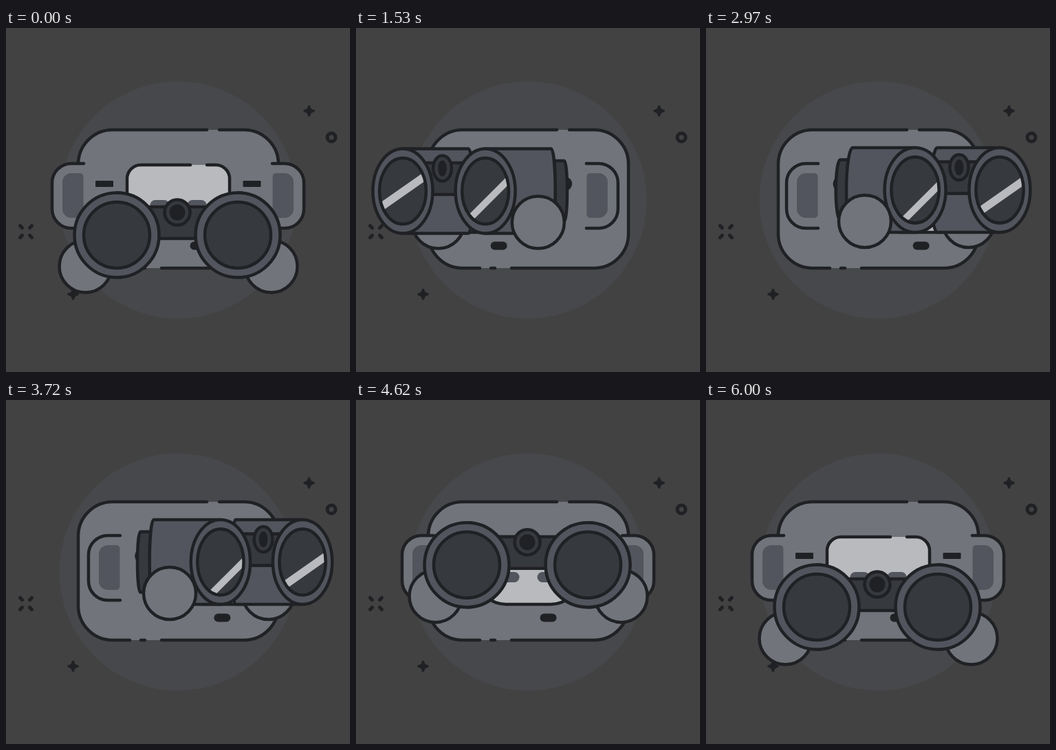
An HTML page with a canvas for the animation above (6030 ms loop, 500 by 500 pixels).

```html
<!DOCTYPE html>
<html lang="en">
<head>
<meta charset="utf-8">
<title>Looking around</title>
<style>
html, body { margin: 0; width: 100%; height: 100%; overflow: hidden; background: #424242; }
canvas { display: block; width: 500px; height: 500px; }
</style>
</head>
<body>
<canvas id="stage" width="500" height="500"></canvas>
<script>
const ctx = document.getElementById('stage').getContext('2d');
const LOOP = 6030;
const INK = '#202125', GREY = '#71757b', SLATE = '#52555d', DARK = '#36393e', LIGHT = '#b9babe';
const LINE = 4.5;

// Steps: start, end, from, to, power of the ease
const TURN = [
  [645, 1915, 0, -1.18, 2.5],
  [1915, 3320, -1.18, 1.18, 2.5],
  [3400, 4495, 1.18, 0, 2.5]
];
const LIFT = [
  [255, 1915, 0, 1, 4],
  [4150, 5730, 1, 0, 4]
];

function ease(x, p) {
  return x < 0.5 ? Math.pow(2 * x, p) / 2 : 1 - Math.pow(2 - 2 * x, p) / 2;
}

function valueAt(steps, t) {
  let v = steps[0][2];
  for (const [start, end, from, to, p] of steps) {
    if (t < start) break;
    v = from + (to - from) * ease(Math.min(1, (t - start) / (end - start)), p);
  }
  return v;
}

function paint(fill, stroke = true) {
  if (fill) { ctx.fillStyle = fill; ctx.fill(); }
  if (stroke) { ctx.strokeStyle = INK; ctx.lineWidth = LINE; ctx.stroke(); }
}

function oval(x, y, rx, ry, fill, stroke) {
  ctx.beginPath();
  ctx.ellipse(x, y, rx, ry, 0, 0, 2 * Math.PI);
  paint(fill, stroke);
}

function box(x, y, w, h, r, fill, stroke) {
  ctx.beginPath();
  ctx.roundRect(x, y, w, h, r);
  paint(fill, stroke);
}

function trace(d, width = LINE) {
  ctx.strokeStyle = INK;
  ctx.lineWidth = width;
  ctx.stroke(new Path2D(d));
}

function at(x, y, sx, draw) {
  ctx.save();
  ctx.translate(x, y);
  ctx.scale(sx, 1);
  draw();
  ctx.restore();
}

function sparkle(x, y) {
  at(x, y, 1, () => {
    const star = new Path2D('M0-6.5Q.8-.8 6.5 0Q.8.8 0 6.5Q-.8.8-6.5 0Q-.8-.8 0-6.5Z');
    ctx.fillStyle = INK;
    ctx.fill(star);
    ctx.strokeStyle = INK;
    ctx.lineWidth = 3.5;
    ctx.stroke(star);
  });
}

function backdrop() {
  ctx.fillStyle = '#424242';
  ctx.fillRect(0, 0, 500, 500);
  oval(250, 250, 172.5, 172.5, '#47484b', false);
  sparkle(440.5, 120.5);
  sparkle(97.5, 387);
  ctx.beginPath();
  ctx.arc(473, 159, 6, 0, 2 * Math.PI);
  ctx.strokeStyle = INK;
  ctx.lineWidth = 5;
  ctx.stroke();
  at(29, 296, 1, () => trace('M-8.5-8.5l3 3M8.5-8.5l-3 3M-8.5 8.5l3-3M8.5 8.5l-3-3', 5));
}

function head() {
  box(105, 148, 291, 201, 50, GREY, false);
  trace('M292 148H155A50 50 0 0 0 105 198V299A50 50 0 0 0 155 349H180' +
    'M196 349H202M226 349H346A50 50 0 0 0 396 299V198A50 50 0 0 0 346 148H310');
}

function face(shift, mouthShift, lift) {
  at(shift, 0, 1, () => {
    box(176, 199, 149, 98, [20, 20, 42, 42], LIGHT, false);
    trace('M268 199H196A20 20 0 0 0 176 219V255A42 42 0 0 0 218 297H283' +
      'A42 42 0 0 0 325 255V219A20 20 0 0 0 305 199H292');
    for (const x of [209.5, 263.5]) box(x, 250, 28, 15, 7.5, SLATE, false);
  });
  const w = 26 - 5 * lift, h = 9 + 12 * lift;
  for (const x of [143, 357.5]) {
    box(x + shift * 0.82 - w / 2, 226.5 - h / 2, w, h, 1 + 9.5 * lift, INK, false);
  }
  box(267.5 + mouthShift, 310.5, 24, 12, 6, INK, false);
}

function ear(x, side) {
  at(x, 0, -side, () => {
    box(0, 197, 48, 94, [28, 0, 0, 28], GREY, false);
    trace('M46 197H28A28 28 0 0 0 0 225V263A28 28 0 0 0 28 291H46');
    box(15, 211, 30.5, 65, [13, 5, 5, 13], SLATE, false);
  });
}

// Side of a tube running from the lens back towards the head
function tube(x, y, back, rx, ry, dir, fill) {
  ctx.beginPath();
  ctx.moveTo(x, y - ry);
  ctx.lineTo(x + dir * back, y - ry);
  ctx.ellipse(x + dir * back, y, rx, ry, 0, -Math.PI / 2, Math.PI / 2, dir < 0);
  ctx.lineTo(x, y + ry);
  ctx.closePath();
  paint(fill);
}

function barrel(x, y, u, dir) {
  const back = 58 * u + 36 * u * u;
  const rx = Math.max(6, 61 - 19 * u - 35 * u * u);
  tube(x, y, back * 1.2, rx * 0.7, 44, dir, DARK);
  tube(x, y, back, rx, 61.5, dir, SLATE);
}

function lens(x, y, rx, glintY, slope) {
  const inner = rx * 0.78;
  oval(x, y, rx, 61.5, SLATE);
  oval(x, y, inner, 48, DARK, false);
  ctx.save();
  ctx.beginPath();
  ctx.ellipse(x, y, inner, 48, 0, 0, 2 * Math.PI);
  ctx.clip();
  ctx.translate(x, y + glintY);
  ctx.beginPath();
  ctx.moveTo(-60, 60 * slope - 7);
  ctx.lineTo(60, -60 * slope - 7);
  ctx.lineTo(60, -60 * slope + 7);
  ctx.lineTo(-60, 60 * slope + 7);
  ctx.fillStyle = LIGHT;
  ctx.fill();
  ctx.restore();
  oval(x, y, inner, 48);
}

function hand(x, y) {
  oval(x, y, 38, 38, GREY);
}

function draw(t) {
  const turn = valueAt(TURN, t), lift = valueAt(LIFT, t);
  const u = Math.abs(turn), u2 = u * u, side = turn > 0 ? 1 : -1;
  const y = 301 - 65.5 * lift, handY = y + 45.5;
  const outerX = 249 + side * (88 + 102.3 * u - 10.3 * u2);
  const nearX = 249 + side * (-88 + 137 * u + 10 * u2);
  const rx = 61.5 - 9.4 * u - 8.3 * u2;
  const outerHand = 250.5 + side * (135 - 4 * u);
  const nearHand = 250.5 + side * (-135 + 96 * u + 23 * u2);
  const handInFront = u > 0.25;

  ctx.lineCap = ctx.lineJoin = 'round';
  backdrop();
  head();
  face(65 * turn, turn * (side < 0 ? 71 : 34), lift);
  const earIn = 45.5 * u + 6 * u2;
  ear(67 + earIn, -1);
  ear(433 - earIn, 1);

  hand(outerHand, handY);
  if (!handInFront) hand(nearHand, handY);
  barrel(outerX, y, u, -side);
  barrel(nearX, y, u, -side);
  box(Math.min(outerX, nearX), y - 41, Math.abs(outerX - nearX), 46, 0, DARK);
  lens(outerX, y, rx, side < 0 ? -80 + 80 * u : -84 + 97 * u, 0.7);
  lens(nearX, y, rx, -84 + (side < 0 ? 100 : 114) * u, 1);

  const knobX = 249 + 122 * turn;
  oval(knobX, y - 33, 18.5 - 5 * u, 18.5, DARK);
  oval(knobX, y - 33, 11.5 - 5 * u, 11.5, INK, false);
  if (handInFront) hand(nearHand, handY);
}

const begin = performance.now();
function tick() {
  draw((performance.now() - begin) % LOOP);
  requestAnimationFrame(tick);
}
tick();
</script>
</body>
</html>
```
